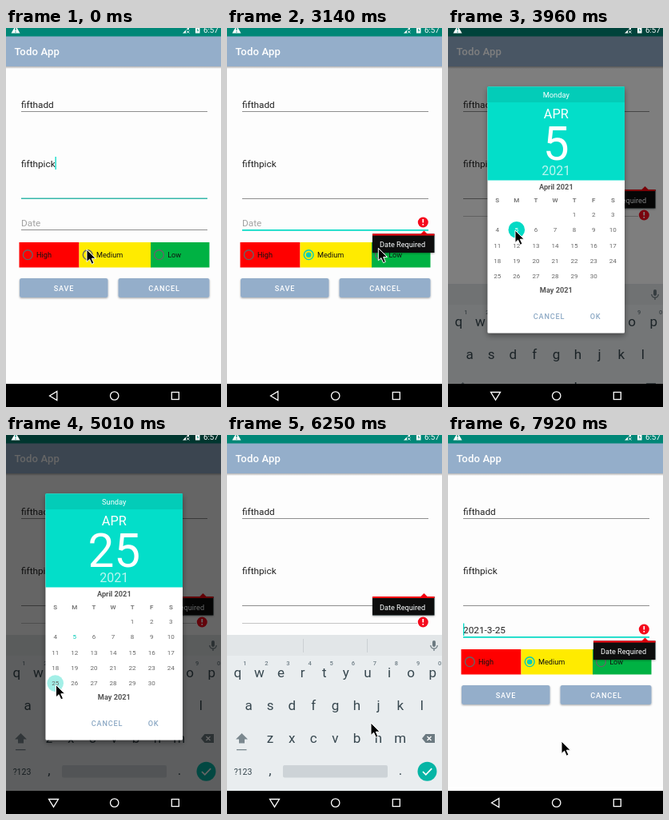
An HTML page that plays this animation: 269x474 px, repeating every 8000 ms.

```html
<!DOCTYPE html>
<html lang="en">
<head>
<meta charset="utf-8">
<title>Todo App</title>
<style>
html, body { margin: 0; width: 100%; height: 100%; overflow: hidden; background: #fff; }
svg { display: block; width: 100%; height: 100%; font-family: Roboto, sans-serif; }
.btn { font-size: 9.16px; font-weight: 500; letter-spacing: .82px; }
.field { font-size: 11.8px; fill: #222; }
.small { font-size: 9.16px; }
.mid { text-anchor: middle; }
</style>
</head>
<body>
<svg id="stage" viewBox="0 0 269 474">
  <defs>
    <linearGradient id="fall" x2="0" y2="1">
      <stop stop-color="#000" stop-opacity=".3"/><stop offset="1" stop-color="#000" stop-opacity="0"/>
    </linearGradient>
    <filter id="shadow" x="-20%" y="-20%" width="140%" height="150%">
      <feDropShadow dx="0" dy="1" stdDeviation="1" flood-opacity=".35"/>
    </filter>
    <filter id="deep" x="-10%" y="-10%" width="120%" height="120%">
      <feDropShadow dx="0" dy="3" stdDeviation="3.5" flood-opacity=".4"/>
    </filter>
    <clipPath id="screen"><rect width="269" height="445"/></clipPath>
    <clipPath id="saveClip"><rect x="17" y="313" width="110.500" height="24" rx="2.500"/></clipPath>
  </defs>

  <g clip-path="url(#screen)">
    <rect width="269" height="445" fill="#fdfdfd"/>
    <rect y="440" width="269" height="5" fill="#fff"/>
    <rect y="48" width="269" height="3" fill="url(#fall)"/>
    <rect width="269" height="11" fill="#008777"/>
    <rect y="10.500" width="269" height="37.500" fill="#94aeca"/>
    <text x="10.500" y="34" font-size="13.100" font-weight="500" fill="#fff" letter-spacing=".15">Todo App</text>

    <text class="field" x="19" y="100">fifthadd</text>
    <rect x="19" y="104" width="233" height="1" fill="#8e8e8e"/>
    <text class="field" x="19" y="174">fifthpick</text>
    <rect id="pickLine" x="19" width="233"/>
    <rect id="pickCaret" x="61.500" y="161" width="1.300" height="16" fill="#03dac5"/>

    <g id="lower">
      <text id="date" class="field" x="19" y="248"></text>
      <rect id="dateLine" x="19" y="252" width="233"/>
      <rect id="dateCaret" x="19" y="235.500" width="1.300" height="15.500" fill="#03dac5"/>
      <g id="choices"></g>
      <g filter="url(#shadow)" fill="#94aeca">
        <rect x="17" y="313" width="110.500" height="24" rx="2.500"/>
        <rect x="140.500" y="313" width="114" height="24" rx="2.500"/>
      </g>
      <circle id="saveRipple" cx="73" cy="326" fill="#fff" opacity=".25" clip-path="url(#saveClip)"/>
      <g class="btn mid" fill="#fff"><text x="72.500" y="328.500">SAVE</text><text x="198" y="328.500">CANCEL</text></g>
    </g>
    <rect id="shortLine" x="19" y="235" width="219" height="1" fill="#c4c4c4"/>

    <g id="errorIcon">
      <circle cx="245.300" cy="243" r="6.500" fill="#f50a1c"/>
      <path d="M245.300 239v4.500M245.300 245v1.700" stroke="#fff" stroke-width="1.700"/>
    </g>
    <g id="popup" filter="url(#shadow)">
      <path d="M242 258l4.500-4.500 4.500 4.500z" fill="#f5000f"/>
      <rect x="182" y="257.500" width="77.500" height="23.500" fill="#0d1011"/>
      <rect x="182" y="257.500" width="77.500" height="2" fill="#f5000f"/>
      <text class="small" x="191" y="274" fill="#fff">Date Required</text>
    </g>

    <g id="keyboard"></g>
    <rect id="dim" width="269" height="445"/>
  </g>

  <g id="dialog">
    <rect x="49.500" y="73.500" width="171.500" height="308" rx="1.500" fill="#fff" filter="url(#deep)"/>
    <rect x="49.500" y="73.500" width="171.500" height="117" fill="#03dec9"/>
    <rect x="49.500" y="73.500" width="171.500" height="19.500" fill="#03ccb8"/>
    <g class="mid" fill="#fff">
      <text id="weekday" x="135.300" y="86.500" font-size="9.300"></text>
      <text x="135.300" y="113" font-size="16.300">APR</text>
      <text id="bigDay" x="135.300" y="164.500" font-size="58.500"></text>
      <text x="135.300" y="183.500" font-size="16" opacity=".72">2021</text>
    </g>
    <g id="calendar" class="mid"></g>
    <g class="btn mid" fill="#8ba8c4"><text x="126.500" y="364">CANCEL</text><text x="184.500" y="364">OK</text></g>
  </g>

  <g fill="#fff">
    <path d="M6.500 6.500L12-3l5.500 9.500z"/>
    <path d="M12 0v3M12 4.200v1.300" stroke="#008777" stroke-width="1.200"/>
    <path d="M221 6.500L229-1.500V2h-4v4.500z"/>
    <path d="M226 3.200l3.300 3.300M229.300 3.200L226 6.500" stroke="#fff"/>
    <path d="M237 0h5.500v6.500H237z"/>
    <path d="M240.200 0l-1.700 3.200h1.500L239.500 5.500 241.300 2.500h-1.500z" fill="#008777"/>
    <text x="247" y="6.300" font-size="9.700">6:57</text>
  </g>

  <rect y="445" width="269" height="29"/>
  <circle id="navRipple" cx="59.500" cy="460" r="13" fill="#4a4a4a"/>
  <g fill="none" stroke="#fff" stroke-width="1.300">
    <path id="back"/>
    <circle cx="135.700" cy="460" r="5.200"/>
    <rect x="207.300" y="455.500" width="9" height="9"/>
  </g>
  <path id="mouse" d="M0 0V15.500L3.600 12.200 6.300 18.300 9 17.100 6.300 11.200H11.200z" stroke="#fff"/>
</svg>

<script>
const STEP = 208.2, LOOP = 8000;
const $ = id => document.getElementById(id);
const set = (id, attrs) => { for (const k in attrs) $(id).setAttribute(k, attrs[k]); };
const show = (id, on) => set(id, { visibility: on ? "visible" : "hidden" });
const label = (x, y, s, extra = "") => `<text x="${x}" y="${y}" ${extra}>${s}</text>`;

function buildChoices() {
  const items = [["High", 16.5, 75, "#f00"], ["Medium", 91.5, 90, "#ffeb00"], ["Low", 181, 73.5, "#00b243"]];
  $("choices").innerHTML = items.map(([name, x, w, color], i) => {
    const cx = [27.3, 102.2, 191.5][i];
    return `<rect x="${x}" y="268" width="${w}" height="31.500" fill="${color}"/>
      <circle id="ring${i}" cx="${cx}" cy="283.700" r="5.900" fill="none" stroke="#666" stroke-width="1.400"/>
      ${label(cx + 10.7, 287, name, 'class="small" fill="#111"')}`;
  }).join("") + '<circle id="dot" cx="102.200" cy="283.700" r="3.300" fill="#03cdb9"/>';
}

function buildKeyboard() {
  const row = (keys, x0, y) => [...keys].map((c, i) => label(x0 + i * 27.1, y, c)).join("");
  const digits = [..."1234567890"].map((c, i) => label(22.3 + i * 27.1, 288, c)).join("");
  $("keyboard").innerHTML = `
    <rect y="250" width="269" height="195" fill="#e9edef"/>
    <rect y="250" width="269" height="26" fill="#e2e6e8"/>
    <path d="M95.500 255v17M175.500 255v17" stroke="#cbd0d3"/>
    <g fill="#6c7a81"><rect x="257" y="257" width="4" height="8" rx="2"/>
      <path d="M254.800 263a4.200 4.200 0 0 0 8.400 0M259 267v3" fill="none" stroke="#6c7a81" stroke-width="1.300"/></g>
    <g class="mid" fill="#37474f" font-size="17">
      ${row("qwertyuiop", 13.3, 302.5)}${row("asdfghjkl", 27, 344)}${row("zxcvbnm", 54, 385)}
      ${label(54, 425, ",")}${label(217, 425, ".")}${label(20, 424.5, "?123", 'font-size="10.500"')}
    </g>
    <g class="mid" fill="#6f7e86" font-size="7.500" font-weight="500">${digits}</g>
    <path d="M18.500 373l7.500 7.500h-4v5h-7v-5h-4z" fill="#7b888f"/>
    <rect x="12" y="393" width="12.500" height="1.300" fill="#7b888f"/>
    <path d="M244 379.500l4.500-5.500H260v11h-11.500z" fill="#6c7a81"/>
    <path d="M250.500 377l5 5M255.500 377l-5 5" stroke="#fff" stroke-width="1.300"/>
    <rect x="70" y="413" width="131" height="15.500" rx="2" fill="#cdd3d7"/>
    <circle cx="250.500" cy="420.700" r="12" fill="#06b5a5"/>
    <path d="M245 421l3.800 3.800 7.400-7.700" fill="none" stroke="#fff" stroke-width="1.700"/>`;
}

function buildCalendar() {
  const colX = c => 61.7 + c * 24.1;
  const heads = [..."SMTWTFS"].map((c, i) => label(colX(i), 218, c, 'font-weight="500"')).join("");
  let days = "";
  for (let d = 1; d <= 30; d++) {
    const cell = d + 3;
    days += label(colX(cell % 7), 235.8 + Math.floor(cell / 7) * 19.4, d, `id="day${d}"`);
  }
  $("calendar").innerHTML = `<circle id="pick" r="10.300"/>
    <g font-size="9.200" font-weight="700" fill="#555">${label(135.3, 202, "April 2021")}${label(135.3, 330.5, "May 2021")}</g>
    <g font-size="8" fill="#666">${heads}${days}</g>`;
}

// Pointer stops: step, x, y
const path = [
  [0, 101, 277], [2, 101, 278], [4, 92, 318], [5, 88, 331], [7, 88, 330], [9, 193, 288],
  [11, 235, 292], [13, 257, 298], [14, 240, 286], [17, 88, 254], [19, 84, 253],
  [22, 64, 308], [23, 62, 312], [25, 63, 313], [28, 182, 358], [29, 182, 357],
  [30, 180, 360], [33, 66, 452], [34, 60, 457], [35, 60, 457], [38, 142, 383]
];

function pointerAt(k) {
  const i = Math.max(1, path.findIndex(p => p[0] >= k));
  const [a, b] = [path[i - 1], path[i]];
  const u = (k - a[0]) / (b[0] - a[0]);
  return [a[1] + (b[1] - a[1]) * u, a[2] + (b[2] - a[2]) * u];
}

function draw(ms) {
  const k = Math.min(38, Math.floor((ms % LOOP + 2) / STEP)), t = k * STEP;
  const chosen = k >= 2, failed = k >= 7, typing = k >= 19 && k <= 35;
  const open = k >= 18 && k <= 28, picked = k >= 24, saved = k >= 29;

  set("mouse", { transform: `translate(${pointerAt(k)})` });
  set("ring1", { stroke: chosen ? "#03cdb9" : "#666" });
  show("dot", chosen);
  set("saveRipple", { r: k === 6 ? 38 : k === 7 ? 62 : 0 });

  set("pickLine", failed ? { y: 213, height: 1, fill: "#8e8e8e" } : { y: 212.5, height: 1.5, fill: "#35b8aa" });
  show("pickCaret", !failed && t % 1000 < 500);
  set("dateLine", failed ? { height: 1.7, fill: "#03dac5" } : { height: 1, fill: "#8e8e8e" });
  show("dateCaret", failed && !typing && (k > 35 || (t - 1250) % 1000 < 500));
  $("date").textContent = saved ? "2021-3-25" : "Date";
  $("date").style.fill = saved ? "#222" : "#a2a2a2";

  set("lower", { display: typing ? "none" : "inline" });
  show("shortLine", typing);
  show("errorIcon", failed);
  show("popup", failed);
  set("errorIcon", { transform: `translate(0 ${typing ? -9 : 0})` });
  set("popup", { transform: `translate(0 ${typing ? -55.5 : 0})` });

  show("keyboard", typing);
  set("keyboard", { transform: `translate(0 ${k === 19 ? 70 : 0})` });
  set("dim", { opacity: k === 19 ? .5 : k > 19 && k < 29 ? .6 : k === 29 ? .1 : 0 });

  set("dialog", { opacity: k === 18 ? .25 : 1, display: open ? "inline" : "none" });
  set("calendar", { display: k > 18 ? "inline" : "none" });
  $("weekday").textContent = picked ? "Sunday" : "Monday";
  $("bigDay").textContent = picked ? 25 : 5;
  const settled = k > 24;
  set("pick", picked
    ? { cx: 61.7, cy: 310.6, fill: settled ? "#03dac5" : "#a3efe7" }
    : { cx: 85.8, cy: 252.4, fill: "#03dac5" });
  set("day5", { fill: picked ? "#03c9b6" : "#fff" });
  set("day25", { fill: settled ? "#fff" : "#666" });

  set("back", { d: typing && k < 35 ? "M53.500 455.500h12l-6 9.700z" : "M54.500 460l9.300-5.500v11z" });
  show("navRipple", k === 35);
}

buildChoices();
buildKeyboard();
buildCalendar();
const start = performance.now();
(function tick() {
  draw(performance.now() - start);
  requestAnimationFrame(tick);
})();
</script>
</body>
</html>
```
